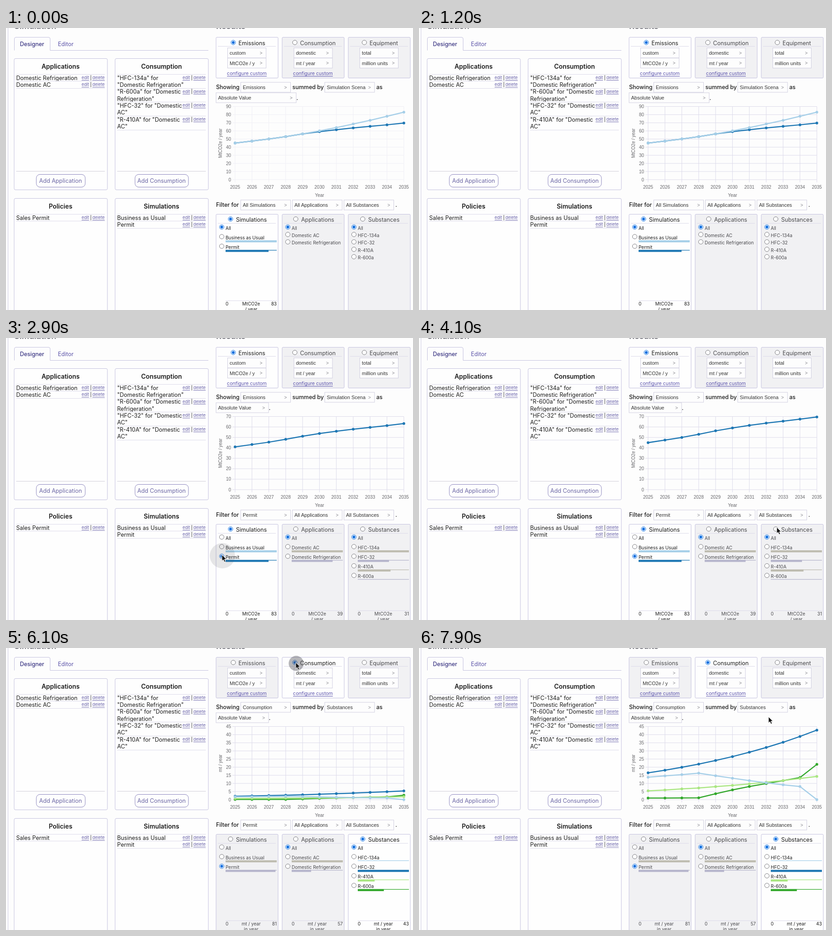
Recreate the animation shown at these times as an HTML page. Size 899 by 623 pixels, loop 8000 ms.

```html
<!DOCTYPE html>
<html lang="en">
<head>
<meta charset="utf-8">
<title>Simulation results</title>
<style>
  html, body { margin: 0; width: 100%; height: 100%; overflow: hidden; background: #fdfdfd; }
  svg { display: block; width: 899px; height: 623px; }
  text { font: 12.5px Inter, sans-serif; fill: #1c1c1c; dominant-baseline: central; white-space: pre; }
  .title { font-size: 18.3px; font-weight: 600; fill: #77777f; dominant-baseline: auto; }
  .head { font-size: 13.9px; font-weight: 600; }
  .tab, .button { fill: #5b53a8; }
  .tab.on { fill: #3c3784; font-weight: 500; }
  .button { font-size: 12.6px; fill: #6a65a4; }
  .link { font-size: 9.3px; fill: #6760a8; text-decoration: underline; }
  .config { font-size: 10.6px; fill: #5a52ac; text-decoration: underline; }
  .label { font-weight: 500; }
  .item { font-size: 10px; }
  .off { fill: #48484c; }
  .select { font: 11px "Liberation Sans", Arial, sans-serif; fill: #333; }
  .chevron { font: 10px "Liberation Sans", Arial, sans-serif; fill: #85858c; }
  .tick { font: 10px "Liberation Sans", Arial, sans-serif; fill: #66666a; }
</style>
</head>
<body>
<svg id="stage" viewBox="0 0 899 623"></svg>
<script>
const LOOP = 8000;
const PALETTE = ['#a6cfe8', '#1f78b4', '#aae682', '#33a82c'];
const MUTED = ['#bebcb0', '#b6b5cc'];
const BORDER = '#c3c0de';
const FAINT = '#dcdaea';
const CHART = { left: 506, top: 173.5, bottom: 335, step: 37.28 };
const COLUMNS = [464, 610, 756];

const stage = document.getElementById('stage');

function add(parent, tag, attrs = {}, content) {
  const node = document.createElementNS('http://www.w3.org/2000/svg', tag);
  for (const key in attrs) node.setAttribute(key, attrs[key]);
  if (content !== undefined) node.textContent = content;
  parent.appendChild(node);
  return node;
}

const text = (g, x, y, str, cls = '', anchor = 'start') =>
  add(g, 'text', { x, y, class: cls, 'text-anchor': anchor }, str);

const line = (g, x1, y1, x2, y2, stroke = FAINT) =>
  add(g, 'path', { d: `M${x1} ${y1}L${x2} ${y2}`, stroke, fill: 'none' });

const box = (g, x, y, width, height, fill = '#fefefe', rx = 2, stroke = BORDER) =>
  add(g, 'rect', { x: x + .5, y: y + .5, width, height, rx, fill, stroke });

function radio(g, cx, cy, on) {
  add(g, 'circle', { cx, cy, r: 5, fill: '#fff', stroke: on ? '#0f6fe0' : '#77777c' });
  if (on) add(g, 'circle', { cx, cy, r: 3.1, fill: '#0f6fe0' });
}

function select(g, x, y, width, str) {
  box(g, x, y, width, 22, '#fdfdfd', 0, '#d0cee0');
  text(g, x + 5, y + 11.5, str, 'select');
  text(g, x + width - 10.5, y + 11.5, '>', 'chevron', 'middle');
}

/* Designer side */

function editLinks(g, right, y) {
  text(g, right - 51, y, 'edit', 'link');
  text(g, right - 30.5, y, '|', 'item', 'middle');
  text(g, right, y, 'delete', 'link', 'end');
}

function listPanel(g, x, y, title, entries, button) {
  box(g, x, y, 206, button ? 290 : 260, '#fefefe', 3);
  text(g, x + 103, y + 18, title, 'head', 'middle');
  line(g, x + 5, y + 35.5, x + 201, y + 35.5);
  let rowY = y + 43;
  for (const entry of entries) {
    editLinks(g, x + 200.5, rowY - .5);
    for (const row of entry.split('\n')) {
      text(g, x + 5, rowY, row);
      rowY += 15.35;
    }
    const ruleY = Math.round(rowY - 8) + .5;
    line(g, x + 5, ruleY, x + 201, ruleY);
  }
  if (!button) return;
  line(g, x + 5, y + 249.5, x + 201, y + 249.5, '#cfcdd8');
  box(g, x + 103 - button.width / 2, y + 256, button.width, 28, '#fefefe', 8, '#8a84bd');
  text(g, x + 103, y + 270, button.label, 'button', 'middle');
}

function drawDesigner(g) {
  line(g, 4.5, 0, 4.5, 623, '#cdcbe3');
  text(g, 18, 1.5, 'Simulation', 'title');
  text(g, 464, 1.5, 'Results', 'title');
  add(g, 'path', { d: 'M18.5 49.5V24q0-3.5 3.5-3.5H94q3.5 0 3.5 3.5V49.5H447', fill: 'none', stroke: BORDER });
  text(g, 57.5, 35, 'Designer', 'tab on', 'middle');
  text(g, 132, 35, 'Editor', 'tab', 'middle');
  listPanel(g, 17.5, 67, 'Applications', ['Domestic Refrigeration', 'Domestic AC'],
    { label: 'Add Application', width: 108 });
  listPanel(g, 240.5, 67, 'Consumption', [
    '"HFC-134a" for\n"Domestic Refrigeration"',
    '"R-600a" for "Domestic\nRefrigeration"',
    '"HFC-32" for "Domestic\nAC"',
    '"R-410A" for "Domestic\nAC"'
  ], { label: 'Add Consumption', width: 118 });
  listPanel(g, 17.5, 376, 'Policies', ['Sales Permit']);
  listPanel(g, 240.5, 376, 'Simulations', ['Business as Usual', 'Permit']);
}

/* Results side */

const METRICS = [
  { name: 'Emissions', radioX: 502, selectX: 489, options: ['custom', 'MtCO2e / y'], custom: true },
  { name: 'Consumption', radioX: 638, selectX: 635.5, options: ['domestic', 'mt / year'], custom: true },
  { name: 'Equipment', radioX: 791.5, selectX: 781, options: ['total', 'million units'] }
];

const FILTERS = [
  { name: 'Simulations', radioX: 496, items: ['Business as Usual', 'Permit'] },
  { name: 'Applications', radioX: 640, items: ['Domestic AC', 'Domestic Refrigeration'] },
  { name: 'Substances', radioX: 788, items: ['HFC-134a', 'HFC-32', 'R-410A', 'R-600a'] }
];

const shared = [45, 47.5, 50, 53, 56.3];
const usual = [...shared, 60, 64.1, 68.5, 73, 78, 83];
const permit = [...shared, 59.1, 61.5, 63.7, 65.6, 67.5, 69.6];

const emissionBars = [[1, .84], [1, .8], [1, .61, .64, 0]];
const states = [
  {
    start: -2000, metric: 0, group: 0, chosen: 0, sumBy: 'Simulation Scena',
    max: 90, tick: 10, series: [usual, permit], colors: PALETTE,
    bars: [[1, .84], null, null], ends: [83], unit: ['MtCO2e', '/ year']
  },
  {
    start: 2450, metric: 0, group: 0, chosen: 2, sumBy: 'Simulation Scena',
    max: 70, tick: 10, series: [permit], colors: [PALETTE[1]],
    bars: emissionBars, ends: [83, 39, 31], unit: ['MtCO2e', '/ year']
  },
  {
    start: 4630, metric: 0, group: 2, chosen: 2, sumBy: 'Substances',
    max: 40, tick: 5, colors: PALETTE, series: [
      [32, 32.5, 33.2, 34.2, 35.3, 35.7, 35.6, 34.9, 33.9, 32.5, 30.9],
      [4.6, 5.8, 7.1, 8.5, 9.6, 11, 12.3, 13.8, 15.3, 17, 18.8],
      [8.4, 9, 9.7, 10.5, 11.4, 12.5, 13.7, 14.9, 16.4, 17.9, 19.7],
      Array(11).fill(0)
    ],
    bars: emissionBars, ends: [83, 39, 31], unit: ['MtCO2e', '/ year']
  },
  {
    start: 6068, metric: 1, group: 2, chosen: 2, sumBy: 'Substances',
    max: 45, tick: 5, colors: PALETTE, series: [
      [13.8, 14.6, 15.4, 16.3, 14.7, 13.2, 11.7, 10.4, 9.1, 8.1, 0],
      [16.5, 18.1, 19.9, 21.9, 24.1, 26.5, 29.2, 32.1, 35.3, 38.9, 42.8],
      [5.4, 5.9, 6.6, 7.2, 8, 8.8, 9.7, 10.7, 11.8, 13, 14.3],
      [1, 1, 1.05, 1.1, 3.6, 6, 8.1, 9.9, 11.7, 13.6, 21.7]
    ],
    bars: [[1, .975], [1, .38], [0, 1, .33, .51]], ends: [81, 57, 43], unit: ['mt / year', 'in year']
  }
];

function drawMetric(g, metric, x, active) {
  box(g, x - .5, 20, 137, 90, active ? '#fefefe' : '#f1f1f3');
  radio(g, metric.radioX, 32, active);
  text(g, metric.radioX + 11.5, 33, metric.name, active ? '' : 'off');
  line(g, x + 4, 40.5, x + 132, 40.5);
  metric.options.forEach((option, i) => select(g, metric.selectX, 43.5 + i * 22.5, 85, option));
  if (metric.custom) text(g, x + 68, 100.5, 'configure custom', 'config', 'middle');
}

function drawFilter(g, state, index) {
  const filter = FILTERS[index], x = COLUMNS[index], bars = state.bars[index];
  const active = state.group === index;
  const chosen = index === 0 ? state.chosen : 0;
  const shade = active ? '' : ' off';
  const pitch = bars ? 21.2 : 16.4;
  box(g, x - .5, 411, 137, 230, active ? '#fefefe' : '#f1f1f3');
  radio(g, filter.radioX, 422, active);
  text(g, filter.radioX + 12, 423.5, filter.name, shade);
  line(g, x + 4, 431.5, x + 132, 431.5);

  ['All', ...filter.items].forEach((item, i) => {
    const y = 441.5 + i * pitch;
    radio(g, x + 12.5, y - 1.8, chosen === i);
    text(g, x + 21, y, item, 'item' + shade);
    if (!bars || i === 0) return;
    const fill = active ? PALETTE[i - 1] : MUTED[(i - 1) % 2];
    const barY = y + 6.4;
    add(g, 'rect', { x: x + 21, y: barY, width: 113, height: 1.3, fill });
    add(g, 'rect', { x: x + 21, y: barY, width: 113 * bars[i - 1], height: 4.4, fill });
  });

  if (!bars) return;
  line(g, x + 21, 602.5, x + 134, 602.5);
  text(g, x + 21, 608.5, '0', 'item' + shade);
  text(g, x + 134, 608.5, state.ends[index], 'item' + shade, 'end');
  state.unit.forEach((part, i) => text(g, x + 77.5, 608.5 + i * 12, part, 'item' + shade, 'middle'));
}

const yearX = i => CHART.left + i * CHART.step;
const valueY = (value, max) => CHART.bottom - value / max * (CHART.bottom - CHART.top);

function drawChart(g, state) {
  const grid = add(g, 'g');
  const right = yearX(10);
  for (let v = 0; v <= state.max; v += state.tick) {
    const y = valueY(v, state.max);
    line(grid, CHART.left - 6, y, right, y);
    text(g, 497, y, v, 'tick', 'end');
  }
  for (let i = 0; i <= 10; i++) {
    line(grid, yearX(i), CHART.top, yearX(i), CHART.bottom + 6);
    text(g, yearX(i), 351, 2025 + i, 'tick', 'middle');
  }
  text(g, 692.5, 369.5, 'Year', 'tick', 'middle');
  const unit = state.metric ? 'mt / year' : 'MtCO2e / year';
  text(g, 0, 0, unit, 'tick', 'middle').setAttribute('transform', 'translate(473 254.5) rotate(-90)');

  // The first series lies on top.
  state.plots = state.series.map((values, i) => ({ values, color: state.colors[i] })).reverse();
  for (const plot of state.plots) {
    plot.path = add(g, 'path', { fill: 'none', stroke: plot.color, 'stroke-width': 2.5, 'stroke-linejoin': 'round' });
    plot.dots = plot.values.map((_, i) => add(g, 'circle', { cx: yearX(i), r: 3, fill: plot.color }));
  }
  state.grid = grid;
}

function drawState(state) {
  const g = state.node = add(stage, 'g');
  METRICS.forEach((metric, i) => drawMetric(g, metric, COLUMNS[i], state.metric === i));

  const wide = state.chosen === 0;
  text(g, 464, 130.5, 'Showing', 'label');
  select(g, 518, 119.5, 110, METRICS[state.metric].name);
  text(g, 632.5, 130.5, 'summed by', 'label');
  select(g, 703.5, 119.5, 110, state.sumBy);
  text(g, 818, 130.5, 'as', 'label');
  select(g, 463.5, 142.5, wide ? 177 : 116, 'Absolute Value');
  text(g, wide ? 641.5 : 580.5, 154, '.', 'label');

  drawChart(g, state);

  text(g, 464, 390.5, 'Filter for', 'label');
  [wide ? 'All Simulations' : 'Permit', 'All Applications', 'All Substances']
    .forEach((str, i) => select(g, 518 + i * 114, 379.5, 110, str));
  text(g, 860, 390.5, '.', 'label');
  FILTERS.forEach((_, i) => drawFilter(g, state, i));
}

/* Motion */

const pointerKeys = [
  [1400, 600, 640], [2350, 477, 479], [3150, 477, 479], [4000, 790, 418],
  [4600, 792, 421], [5250, 792, 421], [5950, 640, 32], [6900, 640, 32], [7900, 772, 152]
];

function pointerAt(t) {
  const next = pointerKeys.findIndex(key => key[0] > t);
  if (next === 0) return pointerKeys[0].slice(1);
  if (next < 0) return pointerKeys[pointerKeys.length - 1].slice(1);
  const [t0, x0, y0] = pointerKeys[next - 1], [t1, x1, y1] = pointerKeys[next];
  const p = (t - t0) / (t1 - t0), k = p * p * (3 - 2 * p);
  return [x0 + (x1 - x0) * k, y0 + (y1 - y0) * k];
}

const easeOut = p => 1 - (1 - Math.min(1, p)) ** 4;

drawDesigner(add(stage, 'g'));
states.forEach(drawState);
const ripple = add(stage, 'circle', { fill: '#55555c' });
const pointer = add(stage, 'path', {
  d: 'M0 0V13.5L3.1 10.7 5.4 15.8 7.9 14.7 5.6 9.8H9.8Z',
  fill: '#111', stroke: '#fff', 'stroke-width': .9
});

function render(t) {
  const current = states.filter(state => state.start <= t).pop();
  for (const state of states) state.node.style.display = state === current ? '' : 'none';

  const age = t - current.start, grown = easeOut(age / 1000);
  for (const { values, path, dots } of current.plots) {
    const ys = values.map(value => valueY(value * grown, current.max));
    path.setAttribute('d', 'M' + ys.map((y, i) => `${yearX(i)} ${y}`).join('L'));
    dots.forEach((dot, i) => dot.setAttribute('cy', ys[i]));
  }
  current.grid.setAttribute('opacity', Math.min(1, .4 + t / 1300));

  const [x, y] = pointerAt(t);
  pointer.setAttribute('transform', `translate(${x} ${y})`);
  const fade = Math.max(0, 1 - age / 650);
  ripple.setAttribute('cx', x + 1);
  ripple.setAttribute('cy', y + 2);
  ripple.setAttribute('r', 14 + 14 * easeOut(age / 650));
  ripple.setAttribute('opacity', .45 * fade);
}

const begin = performance.now();
function frame() {
  render((performance.now() - begin) % LOOP);
  requestAnimationFrame(frame);
}
frame();
</script>
</body>
</html>
```
